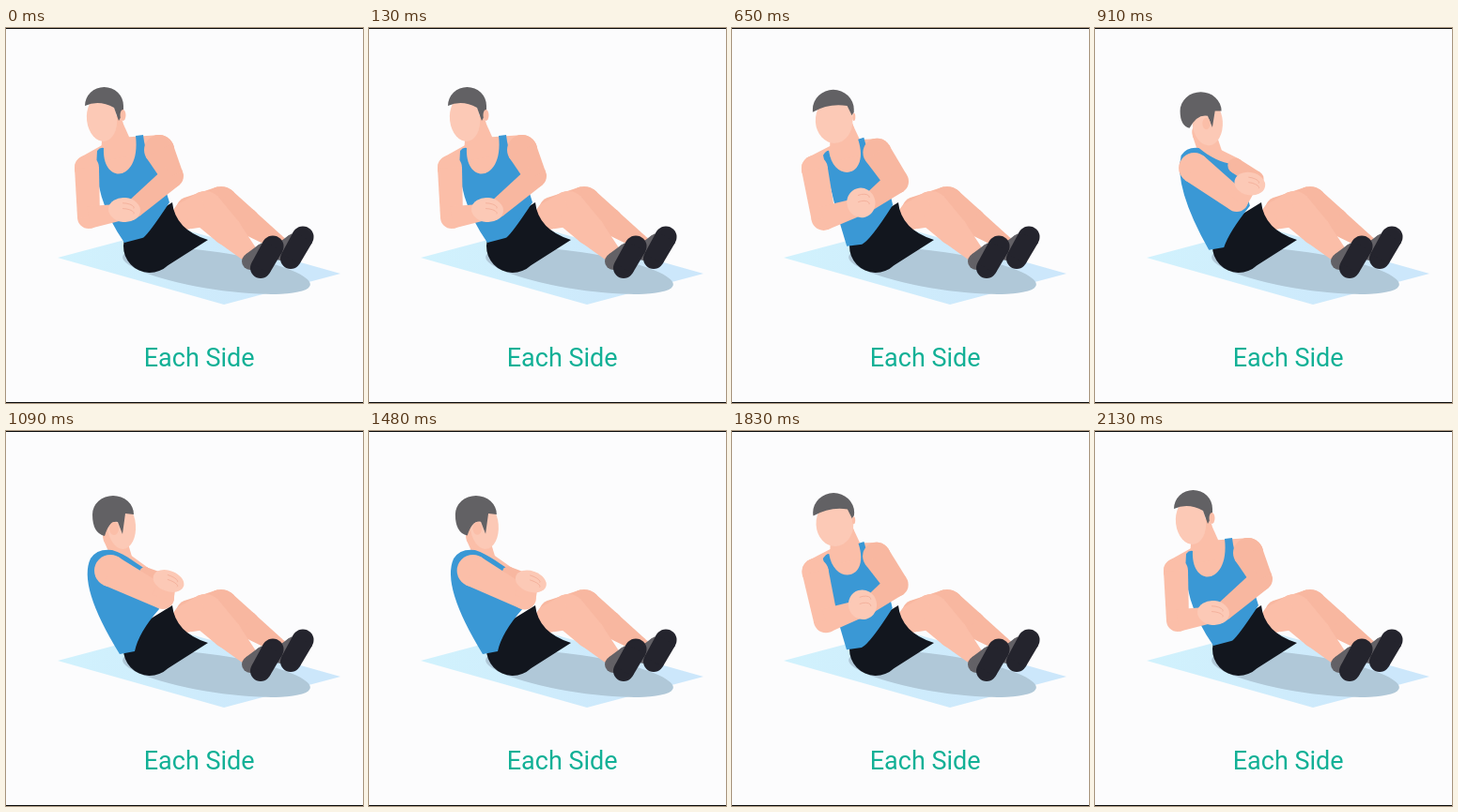
These frames come from a looping animation (380x400 px, 2.21 s). An HTML page with a canvas:

```html
<!DOCTYPE html>
<html lang="en">
<head>
<meta charset="utf-8">
<title>Seated twist</title>
<style>
html, body { margin: 0; width: 100%; height: 100%; overflow: hidden; background: #fcfcfd; }
canvas { display: block; width: 380px; height: 400px; }
</style>
</head>
<body>
<canvas id="stage" width="380" height="400"></canvas>
<script>
const ctx = document.getElementById('stage').getContext('2d');
const LOOP = 2210, STEPS = 51, FRONT = 1 / 3;
const SKIN = '#fbbea8', SKIN_LIGHT = '#fcc9b6', SKIN_SHADE = '#f8b7a0';
const HAIR = '#626164', SHIRT = '#3a98d5', SHORTS = '#12161e', SHOE = '#24242d', SOCK = '#636166';

// 0 = turned left, FRONT = facing the viewer, 1 = turned right
let turn = 0;

const mix = (a, b, u) => a.map((v, i) => v + (b[i] - v) * u);

function pose(left, front, right) {
  return turn < FRONT
    ? mix(left, front, turn / FRONT)
    : mix(front, right, (turn - FRONT) / (1 - FRONT));
}

function smoothstep(from, to, v) {
  const u = Math.min(1, Math.max(0, (v - from) / (to - from)));
  return u * u * (3 - 2 * u);
}

function turnAt(step) {
  return smoothstep(9, 25, step) - smoothstep(33, 48, step);
}

function ellipse(color, x, y, rx, ry, angle = 0) {
  ctx.beginPath();
  ctx.ellipse(x, y, rx, ry, angle, 0, Math.PI * 2);
  ctx.fillStyle = color;
  ctx.fill();
}

function polygon(color, ...points) {
  ctx.beginPath();
  points.forEach(p => ctx.lineTo(...p));
  ctx.closePath();
  ctx.fillStyle = color;
  ctx.fill();
}

// Rounded, tapering limb through joints [x, y, radius].
function limb(color, ...joints) {
  joints.forEach(([x, y, r], i) => {
    ellipse(color, x, y, r, r);
    if (!i) return;
    const [px, py, pr] = joints[i - 1];
    const length = Math.hypot(x - px, y - py);
    const nx = (py - y) / length, ny = (x - px) / length;
    polygon(color,
      [px + nx * pr, py + ny * pr], [x + nx * r, y + ny * r],
      [x - nx * r, y - ny * r], [px - nx * pr, py - ny * pr]);
  });
}

function drawGround() {
  ctx.fillStyle = '#fcfcfd';
  ctx.fillRect(0, 0, 380, 400);
  const mat = ctx.createLinearGradient(55, 245, 300, 285);
  mat.addColorStop(0, '#d1f2fd');
  mat.addColorStop(1, '#cce7fb');
  polygon(mat, [55, 245], [179, 212], [356, 262], [232, 295]);
  ellipse('#b0c8d8', 224, 259, 101, 20, .15);
}

function drawFoot(dx, dy) {
  ctx.save();
  ctx.translate(dx, dy);
  limb(SOCK, [260, 249, 9], [275, 239, 10]);
  limb(SHOE, [271, 256, 11], [284, 233, 11.5]);
  ctx.restore();
}

function drawLegs() {
  limb(SKIN_SHADE, [195, 194, 14], [229, 187, 18], [256, 206, 14], [290, 229, 8]);
  drawFoot(32, -10);
  limb(SKIN, [192, 200, 15], [212, 193, 19], [235, 216, 16], [261, 243, 9]);
  drawFoot(0, 0);
  ctx.beginPath();
  ctx.moveTo(177, 186);
  ctx.arc(153, 233, 28, 3.95, .81, true);
  ctx.lineTo(215, 226);
  ctx.quadraticCurveTo(180, 215, 177, 186);
  ctx.fillStyle = SHORTS;
  ctx.fill();
}

function drawShirt() {
  const hip = pose([126, 229], [122, 233], [121, 238]);
  const strap = pose([97, 131], [97, 136], [90, 136]);
  ctx.beginPath();
  ctx.moveTo(...strap);
  ctx.quadraticCurveTo(...pose([100, 127, 104, 128], [100, 131, 103, 131], [97, 125, 113, 127]));
  ctx.bezierCurveTo(...pose(
    [102, 168, 144, 165, 138, 115],
    [108, 166, 148, 160, 134, 119],
    [128, 131, 142, 144, 154, 151]));
  ctx.lineTo(...pose([146, 114], [140, 117], [156, 155]));
  ctx.quadraticCurveTo(...pose([149, 142, 166, 160], [146, 141, 163, 155], [152, 160, 158, 170]));
  ctx.lineTo(...pose([174, 186], [171, 189], [163, 190]));
  ctx.quadraticCurveTo(...pose([149, 224], [147, 227], [141, 215]), ...pose([145, 224], [138, 231], [137, 235]));
  ctx.lineTo(...hip);
  ctx.quadraticCurveTo(...pose([92, 180], [108, 185], [76, 165]), ...strap);
  ctx.fillStyle = SHIRT;
  ctx.fill();
}

function drawHands() {
  const [x, y, rx, ry, angle] = pose([126, 194, 17, 13, .1], [138, 186, 15, 16, -.3], [173, 160, 17, 11, .35]);
  ellipse(SKIN_LIGHT, x, y, rx, ry, angle);
  ctx.strokeStyle = '#f4b29d';
  ctx.lineWidth = 1;
  for (const offset of [-.25, .2]) {
    ctx.beginPath();
    ctx.ellipse(x, y + ry * offset, rx * .6, ry * .3, angle, -1.8, .2);
    ctx.stroke();
  }
}

function drawHead() {
  ellipse(SKIN_LIGHT, ...pose([102, 97, 16, 24, -.12], [109, 99, 20, 24, -.05], [123, 101, 15, 25, -.08]));
  const [x, y, rx, ry] = pose([104.5, 83, 20.5, 20], [108, 87, 22, 21], [114, 89, 22, 20]);
  const nape = pose([84, 83], [86, 90], [105, 112]);
  ctx.beginPath();
  ctx.moveTo(...nape);
  ctx.quadraticCurveTo(...pose([84, 83], [86, 89], [92, 109]), x - rx, y);
  ctx.ellipse(x, y, rx, ry, 0, Math.PI, 0);
  ctx.lineTo(...pose([125, 90], [130, 90], [127, 88]));
  ctx.lineTo(...pose([120, 99], [128, 93], [124, 110]));
  ctx.lineTo(...pose([115, 85], [123, 83], [119, 97]));
  ctx.quadraticCurveTo(...pose([99, 76], [104, 80], [110, 95]), ...nape);
  ctx.fillStyle = HAIR;
  ctx.fill();
  ellipse(SKIN, ...pose([124.5, 93, 3, 6], [130, 95, 1.5, 4], [115, 104, 5, 7]));
}

function drawBody() {
  const nearShoulder = pose([86, 149, 13], [88, 150, 14], [111, 149, 17]);
  const farShoulder = pose([163, 130, 16], [154, 133, 15], [148, 151, 6]);
  const collar = pose([119, 126, 9], [118, 129, 9], [118, 134, 10]);
  const neck = pose([114, 104, 11], [117, 108, 13], [115, 112, 12]);
  const chest = pose([120, 139, 20], [124, 139, 20], [126, 142, 10]);

  limb(SKIN, nearShoulder, collar, farShoulder);
  limb(SKIN, neck, chest);
  drawShirt();
  limb(SKIN_SHADE, farShoulder,
    pose([177, 158, 12], [175, 164, 13], [170, 160, 7]),
    pose([136, 193, 10], [146, 186, 9], [176, 162, 7]));
  limb(SKIN, nearShoulder,
    pose([88, 202, 12], [98, 203, 13], [167, 178, 12]),
    pose([119, 197, 9], [131, 192, 10], [172, 162, 9]));
  drawHands();
  drawHead();
}

function drawCaption() {
  ctx.font = '27px Roboto, sans-serif';
  ctx.textAlign = 'center';
  ctx.fillStyle = '#12b096';
  ctx.fillText('Each Side', 205.7, 361);
  ctx.fillStyle = '#0a0a0a';
  ctx.fillRect(0, 0, 380, 1);
  ctx.fillRect(0, 399, 380, 1);
}

function render(time) {
  turn = turnAt(Math.floor(time % LOOP / LOOP * STEPS));
  drawGround();
  drawLegs();
  drawBody();
  drawCaption();
}

const start = performance.now();
function tick() {
  render(performance.now() - start);
  requestAnimationFrame(tick);
}
tick();
</script>
</body>
</html>
```
